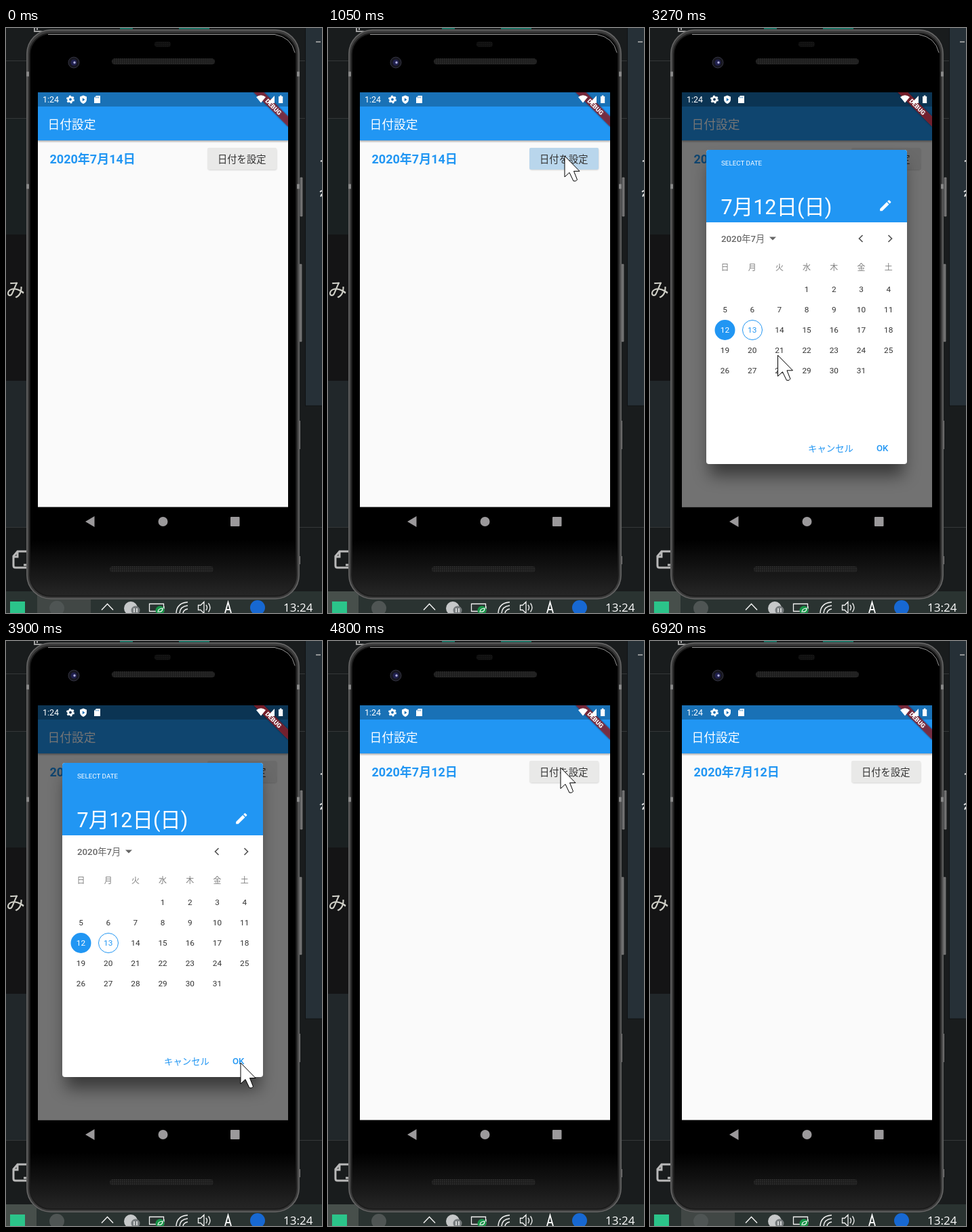
An HTML page for the animation above (6.97 s loop, 466 by 864 pixels).

```html
<!DOCTYPE html>
<html lang="ja">
<head>
<meta charset="utf-8">
<title>日付設定</title>
<style>
html, body { margin: 0; width: 100%; height: 100%; overflow: hidden; background: #191c1d; }
svg { display: block; width: 100%; height: 100%; }
text { font-family: Roboto, "Noto Sans CJK JP", "Noto Sans CJK", sans-serif; white-space: pre; }
.mid { text-anchor: middle; }
</style>
</head>
<body>
<svg viewBox="0 0 466 864" xmlns="http://www.w3.org/2000/svg">
  <defs>
    <clipPath id="screenClip"><rect x="47" y="95" width="369" height="612.500"/></clipPath>
    <filter id="blur" x="-30%" y="-30%" width="160%" height="160%"><feGaussianBlur stdDeviation="12"/></filter>
    <filter id="soft" x="-10%" y="-30%" width="120%" height="160%"><feGaussianBlur stdDeviation="1.3"/></filter>
    <linearGradient id="chin" x1="0" x2="0" y1="0" y2="1">
      <stop offset="0" stop-color="#000"/><stop offset=".9" stop-color="#000"/><stop offset="1" stop-color="#262626"/>
    </linearGradient>
    <pattern id="mesh" width="3" height="3" patternUnits="userSpaceOnUse">
      <rect width="3" height="3" fill="#1b1b1b"/><rect width="1.5" height="1.5" fill="#343434"/>
    </pattern>
  </defs>

  <!-- desktop -->
  <rect width="466" height="864" fill="#191c1d"/>
  <rect y="134" width="40" height="171" fill="#1a2021"/>
  <rect y="305" width="40" height="216" fill="#141415"/>
  <rect y="521" width="40" height="216" fill="#21272a"/>
  <path d="M0 48.5H466M0 133.5H466M0 737.5H466" stroke="#343738"/>
  <path d="M42 0v5h18M46 0v3" fill="none" stroke="#a0a0a0" stroke-width="2"/>
  <path d="M168 .5h19M255 .5h45" stroke="#1d8a78" stroke-width="2"/>
  <rect x="441.500" y="-1" width="26" height="559" fill="#263037" stroke="#101214"/>
  <path d="M457 20.5h7" stroke="#b8b8b8" stroke-width="1.5"/>
  <path d="M464 197l2-1M463 242l3-2M464 249l2-4" stroke="#eee" stroke-width="2"/>
  <text x="0" y="397" font-size="28" font-weight="300" fill="#d0d0c8">み</text>
  <path d="M31 773H17l-6 7v14q0 3 3 3H31M17 773v8h-6M26 793h5" fill="none" stroke="#b9b9b9" stroke-width="3"/>

  <!-- taskbar -->
  <rect y="832" width="466" height="32" fill="#2a3331"/>
  <rect id="tileA" y="832" width="45" height="32" fill="#474f4b"/>
  <rect id="tileB" x="46" y="832" width="79" height="32" fill="#414745"/>
  <rect x="6" y="847" width="22" height="17" fill="#2bc48a"/>
  <circle cx="75" cy="857" r="11" fill="#4f5554"/>
  <g fill="none" stroke="#f2f2f2" stroke-width="1.5">
    <path d="M141 859.5l8.500-9 8.500 9"/>
    <path d="M211.500 850.500h21v11h-21zM233 854v4" stroke-width="1.300"/>
    <path d="M251 864q1-15 17-16M256 864q1-10 12-11M261 864q1-5 7-6"/>
    <path d="M283.500 852.500h3.500l5-5v17l-5-5h-3.500zM295 852q3 4 0 8M298.500 849.500q5 6.500 0 13" stroke-width="1.300"/>
  </g>
  <circle cx="184" cy="857" r="10" fill="#c6c8c9"/>
  <circle cx="191" cy="860" r="6.500" fill="#777c7e"/>
  <path d="M189 857v6M193 857v6" stroke="#fff" stroke-width="1.300"/>
  <circle cx="227" cy="860" r="6.500" fill="#179447"/>
  <path d="M224 863q0-6 7-6 0 6-6 5" fill="none" stroke="#fff" stroke-width="1.200"/>
  <path d="M323 864l4.500-16 4.500 16M324.500 859h6" fill="none" stroke="#fff" stroke-width="1.800"/>
  <circle cx="371" cy="856" r="11" fill="#1768d2"/>
  <text x="409" y="862" font-size="17" fill="#fff" style="font-family:'Open Sans','Noto Sans',sans-serif">13:24</text>

  <!-- phone body -->
  <path d="M434 221h3v57h-3zM433 349h3v114h-3z" fill="#6b6b6b" stroke="#929292" stroke-width=".6"/>
  <path d="M433.500 580v42M433.500 780v12" stroke="#777"/>
  <rect x="30" y="2" width="403" height="842" rx="36" fill="#3c3c3c"/>
  <rect x="31" y="3" width="401" height="840" rx="35" fill="none" stroke="#666" stroke-width="1.500"/>
  <rect x="35" y="8" width="393" height="831" rx="31" fill="url(#chin)" stroke="#1c1c1c" stroke-width="2"/>
  <path d="M62 9.500H396q25 4 30 27" fill="none" stroke="#999"/>
  <path d="M30 68h4M30 234h4M429 68h4M429 234h4" stroke="#898989" stroke-width="7"/>
  <rect x="219" y="20" width="24" height="8" rx="4" fill="url(#mesh)" opacity=".5"/>
  <rect x="156" y="45" width="152" height="9" rx="4.500" fill="url(#mesh)"/>
  <rect x="153" y="795" width="153" height="9" rx="4.500" fill="url(#mesh)"/>
  <circle cx="100" cy="51" r="8" fill="#17171f" stroke="#343442"/>
  <circle cx="100" cy="51" r="4.500" fill="#20204e"/>
  <circle cx="101" cy="51" r="1.700" fill="#b4b4e0"/>
  <g fill="#9b999b">
    <path d="M117 729l13.500-8v16z"/><circle cx="231.500" cy="729" r="7"/>
    <rect x="331" y="722" width="13.500" height="14" rx="1"/>
  </g>

  <!-- app -->
  <g clip-path="url(#screenClip)">
    <rect x="47" y="95" width="369" height="613" fill="#fafafa"/>
    <rect x="47" y="118" width="369" height="50" fill="#000" opacity=".28" filter="url(#soft)"/>
    <rect x="47" y="95" width="369" height="71" fill="#2196f3"/>
    <rect x="47" y="95" width="369" height="21" fill="#1971b6"/>
    <text x="61.500" y="148.500" font-size="17.800" fill="#fff">日付設定</text>
    <text id="date" x="64.500" y="200" font-size="18" font-weight="700" fill="#2196f3"></text>
    <rect x="298" y="178.500" width="101" height="31" rx="2" opacity=".22" filter="url(#soft)"/>
    <rect x="297" y="177" width="102" height="32" rx="2" fill="#e9e9e8"/>
    <rect id="press" x="297" y="177" width="102" height="32" rx="2" fill="#b9d6ec"/>
    <text x="312" y="199" font-size="14.300" fill="#333">日付を設定</text>

    <g id="dialog">
      <rect x="47" y="95" width="369" height="613" opacity=".54"/>
      <rect x="88" y="200" width="286" height="461" opacity=".5" filter="url(#blur)"/>
      <rect x="83" y="180" width="296" height="464" rx="4" fill="#fff"/>
      <path d="M83 287V184q0-4 4-4H375q4 0 4 4V287z" fill="#2196f3"/>
      <text x="105" y="203" font-size="9.800" fill="#fff">SELECT DATE</text>
      <text id="head" x="104.500" y="275" font-size="30.500" fill="#fff"></text>
      <path transform="translate(336.500 251.500) scale(.898)" fill="#fff" d="M3 17.250V21h3.750L17.810 9.940l-3.750-3.750zM20.710 7.040a1 1 0 0 0 0-1.410l-2.340-2.340a1 1 0 0 0-1.410 0l-1.830 1.830 3.750 3.750z"/>
      <text x="105" y="315.800" font-size="13.300" font-weight="500" fill="#666">2020年7月</text>
      <path d="M176 308.500h10l-5 5z" fill="#666"/>
      <path d="M313.500 306l-5 5 5 5M351.500 306l5 5-5 5" fill="none" stroke="#555" stroke-width="1.700"/>
      <circle id="today" cx="151" cy="446" r="14.500" fill="none" stroke="#2196f3"/>
      <circle id="pick" cy="446" r="15" fill="#2196f3"/>
      <g id="days"></g>
      <text x="233" y="626" font-size="13.400" fill="#2196f3">キャンセル</text>
      <text x="334" y="625.300" font-size="13.200" font-weight="500" fill="#2196f3">OK</text>
    </g>

    <!-- banner and system bar stay above the dialog -->
    <g transform="translate(416 95) rotate(45) scale(.898)">
      <rect x="-40" y="28" width="80" height="12" opacity=".5" filter="url(#soft)"/>
      <rect x="-40" y="28" width="80" height="12" fill="#a51f2a" opacity=".68"/>
      <text class="mid" y="37.600" font-size="10.200" font-weight="900" fill="#fff">DEBUG</text>
    </g>
    <text x="54" y="110.300" font-size="12.500" fill="#fff">1:24</text>
    <g fill="#fff">
      <circle cx="95" cy="105.500" r="3.300" fill="none" stroke="#fff" stroke-width="2.800"/>
      <circle cx="95" cy="105.500" r="5" fill="none" stroke="#fff" stroke-width="2" stroke-dasharray="2.600 2.636"/>
      <path d="M114 99.500l5 2v4q0 4-5 6.500-5-2.500-5-6.500v-4z"/>
      <path d="M133 100h6v11h-9v-8z"/>
      <path d="M369 102q7-5.500 14 0l-7 8.500z"/>
      <path d="M396 100v11h-10.500z"/>
      <path d="M402 101h1.800v-1.500h2.600v1.500h1.800v10h-6.200z"/>
    </g>
    <path d="M112.800 103.200v5l3.600-2.500z" fill="#1971b6"/>
    <path d="M132.500 101.500v2M134.500 101.500v2M136.500 101.500v2" stroke="#1971b6" stroke-width=".8"/>
  </g>

  <path id="cursor" d="M0 0V31l7-6.500 6 12.500h3.500l2-2-5-12.500H22z" fill="#fff" stroke="#000"/>
</svg>
<script>
const LOOP = 6970;
const $ = id => document.getElementById(id);
const clamp = v => Math.max(0, Math.min(1, v));
const ramp = (t, a, b) => clamp((t - a) / (b - a));
const colX = c => 110.5 + 40.2 * c;

// pointer stops: time, x, y
const path = [
  [0, 85, 872], [390, 85, 872], [580, 210, 470], [735, 354, 142], [810, 349, 189],
  [1550, 349, 189], [1760, 306, 282], [2000, 214, 432], [2220, 150, 446], [2270, 150, 446],
  [2520, 112, 426], [2830, 108, 441], [3080, 108, 441], [3270, 188, 483], [3530, 322, 604],
  [3750, 346, 623], [4380, 346, 623], [4610, 352, 370], [4800, 343, 187], [5010, 346, 189],
  [5340, 346, 189], [5540, 210, 540], [5730, 85, 872], [LOOP, 85, 872]
];

function slope(i, k) {
  const a = path[i - 1], p = path[i], b = path[i + 1];
  if (!a || !b) return 0;
  const l = (p[k] - a[k]) / (p[0] - a[0]), r = (b[k] - p[k]) / (b[0] - p[0]);
  return l * r <= 0 ? 0 : 2 * l * r / (l + r);
}

function pointer(t) {
  const i = Math.max(0, path.findIndex(p => p[0] > t) - 1);
  const a = path[i], b = path[i + 1], d = b[0] - a[0], u = (t - a[0]) / d;
  return [1, 2].map(k => {
    const e = u * u * (3 - 2 * u);
    return a[k] + (b[k] - a[k]) * e
      + d * u * (1 - u) * ((1 - u) * slope(i, k) - u * slope(i + 1, k));
  });
}

const labels = {};
function addLabel(col, y, size, fill, str) {
  const el = document.createElementNS("http://www.w3.org/2000/svg", "text");
  el.setAttribute("class", "mid");
  el.setAttribute("x", colX(col));
  el.setAttribute("y", y);
  el.setAttribute("font-size", size);
  el.setAttribute("fill", fill);
  el.textContent = str;
  $("days").append(el);
  return el;
}
[..."日月火水木金土"].forEach((w, c) => addLabel(c, 357.5, 12, "#808080", w));
for (let d = 1; d <= 31; d++) {
  const n = d + 2;
  labels[d] = addLabel(n % 7, 390.3 + 30 * Math.floor(n / 7), 11.8, "#333", d);
}

function draw(t) {
  const open = t < 2600 ? ramp(t, 1130, 1310) : 1 - ramp(t, 3930, 4110);
  const moved = t >= 3070;
  $("dialog").setAttribute("opacity", t < 2600 ? 1 - (1 - open) ** 2 : open * open);
  $("press").setAttribute("opacity", ramp(t, 985, 1035) * (1 - ramp(t, 1140, 1310)));
  $("date").textContent = `2020年7月${t < 3930 ? 14 : 12}日`;
  $("head").textContent = moved ? "7月12日(日)" : "7月13日(月)";
  $("pick").setAttribute("cx", colX(moved ? 0 : 1));
  $("today").setAttribute("opacity", moved ? 1 : 0);
  labels[12].setAttribute("fill", moved ? "#fff" : "#333");
  labels[13].setAttribute("fill", moved ? "#2196f3" : "#fff");

  const hover = t < 3000 ? 1 - ramp(t, 40, 80) : ramp(t, 6830, 6920);
  $("tileA").setAttribute("opacity", 1 - hover);
  $("tileB").setAttribute("opacity", hover);

  const [x, y] = pointer(t);
  $("cursor").setAttribute("transform", `translate(${x.toFixed(2)} ${y.toFixed(2)})`);
}

const start = performance.now();
function tick(now) {
  draw(Math.max(0, now - start) % LOOP);
  requestAnimationFrame(tick);
}
draw(0);
requestAnimationFrame(tick);
</script>
</body>
</html>
```
